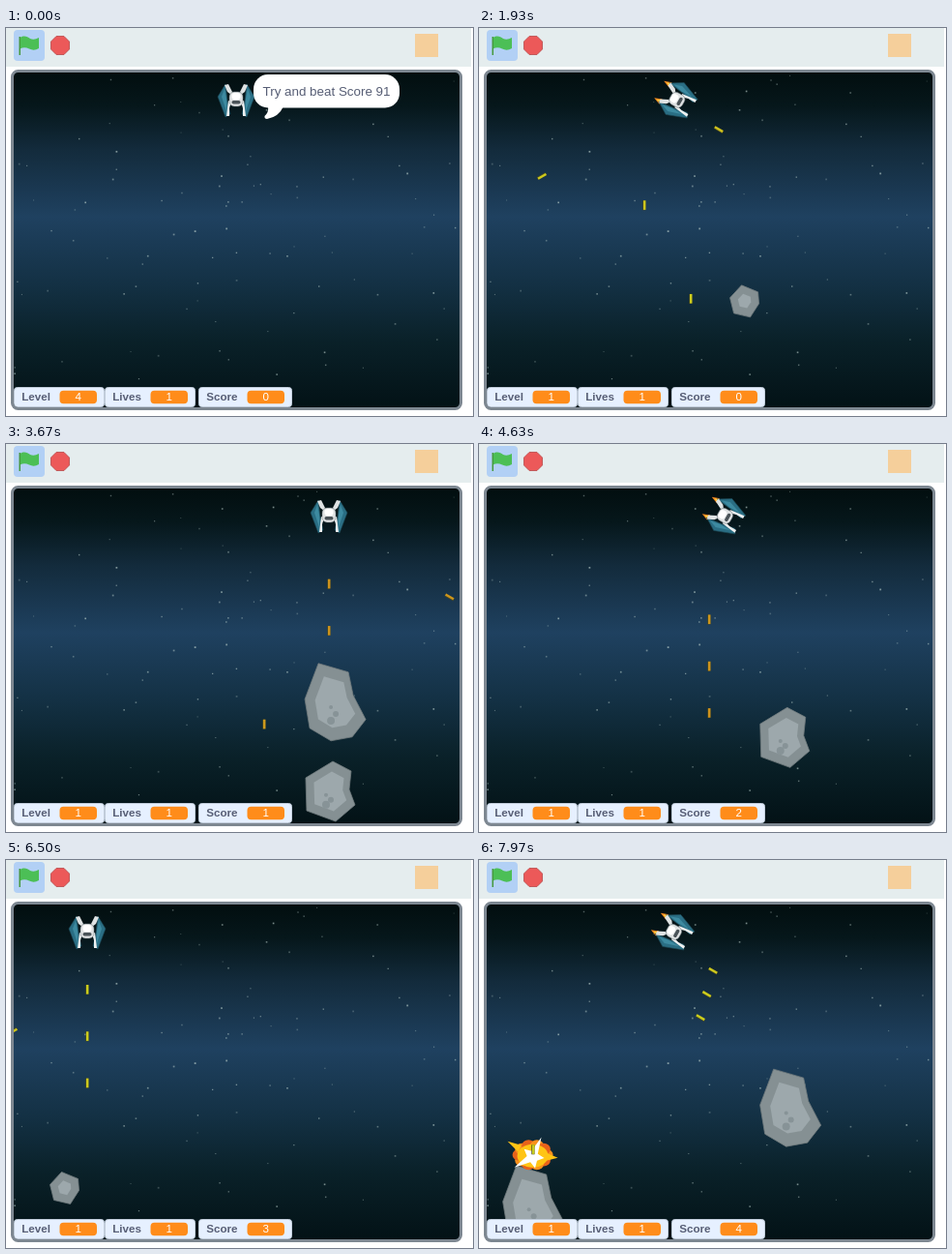
These frames come from a looping animation (483 by 401 pixels, 8000 ms). An HTML page with a canvas:

```html
<!DOCTYPE html>
<html lang="en">
<head>
<meta charset="utf-8">
<title>Asteroid shooter</title>
<style>
html, body { margin: 0; width: 100%; height: 100%; overflow: hidden; background: #fff; }
canvas { display: block; }
</style>
</head>
<body>
<canvas id="stage" width="483" height="401"></canvas>
<script>
const ctx = document.getElementById('stage').getContext('2d');
const LOOP = 8000, INTRO = 600, TAU = Math.PI * 2;
const SPEED = 0.29;                 // ship and bullets, px per ms
const FIRE_GAP = 500 / 3, BULLET_LIFE = 650, MUZZLE = 50;
const SHIP_Y = 75, TILT = Math.PI / 3, LINGER = 100, BLAST = 300;
const FONT = '"Liberation Sans", Arial, sans-serif';

// Moves of the ship: time of departure, x to reach
const moves = [
  [1100, 219], [1500, 171], [1810, 238], [2440, 267], [3105, 334], [3720, 238],
  [4570, 296], [4880, 180], [5800, 84], [6770, 56], [7465, 208]
];

// Bursts of fire: time of the first shot, number of shots
const volleys = [[1230, 5], [2037, 3], [2570, 3], [3103, 4], [4103, 3], [4770, 4], [5470, 8], [6810, 3], [7370, 4]];
const shots = volleys.flatMap(([first, count]) => Array.from({ length: count }, (_, i) => first + i * FIRE_GAP));

const rockKinds = {
  small: { radius: 18, core: .45, edge: [-3,-16, 14,-9, 15,3, 6,17, -11,13, -15,-3] },
  medium: { radius: 31, core: .66, edge: [3,-31, 22,-21, 20,-2, 26,14, 6,31, -24,20, -25,-14] },
  big: { radius: 44, core: .66, edge: [-17,-40, 14,-31, 19,-7, 32,18, 18,36, -4,40, -26,27, -31,-3] }
};

// Position at birth and drift in px per second; hit is when a bullet strikes
const asteroids = [
  { kind: 'small', born: 670, hit: 2860, x: 283, y: 355, vx: -6.7, vy: -58 },
  { kind: 'big', born: 2680, hit: 3720, x: 350, y: 350, vx: -10, vy: -84 },
  { kind: 'medium', born: 3620, hit: 5190, x: 336, y: 362, vx: -20, vy: -58 },
  { kind: 'small', born: 5690, hit: 7530, x: 64, y: 362, vx: -4.3, vy: -29 },
  { kind: 'big', born: 6830, hit: LOOP, x: 326, y: 352, vx: -3.8, vy: -84 },
  { kind: 'big', born: 7650, hit: 7930, x: 55, y: 383, vx: 2, vy: -84 }
];

function seeded(seed) {
  return () => (seed = seed * 16807 % 2147483647) / 2147483647;
}

const random = seeded(91);
const stars = Array.from({ length: 100 }, () => ({
  x: 8 + random() * 460, y: 48 + random() * 318, size: 1 + random() * .8, alpha: .25 + random() * .4
}));

function shipAt(t) {
  let x = 238, dir = 0;
  for (const [depart, goal] of moves) {
    if (t < depart) break;
    const gap = goal - x, run = (t - depart) * SPEED;
    dir = run < Math.abs(gap) ? Math.sign(gap) : 0;
    x = dir ? x + dir * run : goal;
  }
  return { x, angle: -dir * TILT };
}

function bulletAt(t, fired) {
  const { x, angle } = shipAt(fired), reach = MUZZLE + SPEED * (t - fired);
  const edgeX = Math.min(470, Math.max(7, x - Math.sin(angle) * reach));
  return { x: edgeX, y: SHIP_Y + Math.cos(angle) * reach, angle };
}

function rockAt(t, rock) {
  const age = (t - rock.born) / 1000;
  return { x: rock.x + rock.vx * age, y: rock.y + rock.vy * age };
}

function strikes(fired, rock) {
  if (fired > rock.hit || rock.hit - fired > BULLET_LIFE) return false;
  const b = bulletAt(rock.hit, fired), r = rockAt(rock.hit, rock);
  return Math.hypot(b.x - r.x, b.y - r.y) < rockKinds[rock.kind].radius + 5;
}

function paint(fill, stroke, width = 1) {
  ctx.fillStyle = fill;
  ctx.fill();
  if (!stroke) return;
  ctx.strokeStyle = stroke;
  ctx.lineWidth = width;
  ctx.stroke();
}

function poly(points, ...style) {
  ctx.beginPath();
  for (let i = 0; i < points.length; i += 2) ctx.lineTo(points[i], points[i + 1]);
  ctx.closePath();
  paint(...style);
}

function ellipse(x, y, rx, ry, ...style) {
  ctx.beginPath();
  ctx.ellipse(x, y, rx, ry, 0, 0, TAU);
  paint(...style);
}

function box(x, y, w, h, r, ...style) {
  ctx.beginPath();
  ctx.roundRect(x, y, w, h, r);
  paint(...style);
}

function text(str, x, y, font, fill, align = 'left') {
  ctx.font = `${font} ${FONT}`;
  ctx.textAlign = align;
  ctx.fillStyle = fill;
  ctx.fillText(str, x, y);
}

function at({ x, y, angle = 0 }, draw) {
  ctx.save();
  ctx.translate(x, y);
  ctx.rotate(angle);
  draw();
  ctx.restore();
}

function drawToolbar() {
  ctx.fillStyle = '#fff';
  ctx.fillRect(0, 0, 483, 401);
  ctx.fillStyle = '#e5edee';
  ctx.fillRect(0, 0, 481, 40);
  box(8, 2, 32, 32, 4, '#b2d0f5');
  ctx.beginPath();
  ctx.moveTo(14.5, 10);
  ctx.bezierCurveTo(19, 7, 22, 9, 25, 11);
  ctx.quadraticCurveTo(29, 13, 34, 10);
  ctx.lineTo(34, 21);
  ctx.quadraticCurveTo(29, 24, 24, 21.5);
  ctx.quadraticCurveTo(19, 19, 14.5, 21.5);
  paint('#4cbf56');
  ctx.fillStyle = '#45993d';
  ctx.fillRect(13.5, 9, 1.5, 19);
  const octagon = Array.from({ length: 8 }, (_, i) => (i + .5) * TAU / 8);
  poly(octagon.flatMap(a => [56 + 10.3 * Math.cos(a), 18 + 10.3 * Math.sin(a)]), '#ec5959', '#b84848', .8);
  ctx.fillStyle = '#f5cf9b';
  ctx.fillRect(423, 6, 24, 24);
}

function drawSpace() {
  const sky = ctx.createLinearGradient(0, 46, 0, 392);
  const stops = { 0: '#020e0f', .1: '#06171b', .23: '#132b3c', .43: '#1f4160', .64: '#133043', .8: '#0a2129', 1: '#031216' };
  for (const k in stops) sky.addColorStop(k, stops[k]);
  ctx.fillStyle = sky;
  ctx.fillRect(5, 43, 467, 352);
  for (const { x, y, size, alpha } of stars) {
    ctx.fillStyle = `rgb(190 210 205 / ${alpha})`;
    ctx.fillRect(x, y, size, size);
  }
}

function drawRock(t, rock) {
  if (t < rock.born || t >= rock.hit + LINGER) return;
  const { edge, core, radius } = rockKinds[rock.kind];
  at(rockAt(t, rock), () => {
    poly(edge, '#859093', '#717b7e', .8);
    poly(edge.map(v => v * core), '#9da8ac');
    if (radius < 20) return;
    for (let i = 0; i < 3; i++) ellipse(-4 + 5 * (i % 2), radius * (.12 + i * .16), 2 + i, 2 + i, '#879397');
  });
}

function drawBlast(t, rock) {
  const age = t - rock.hit;
  if (age < 0 || age > BLAST) return;
  const { x, y } = rockAt(rock.hit, rock);
  at({ x, y: y - rockKinds[rock.kind].radius * 1.2 }, () => {
    for (let i = 0; i < 10; i++) {
      const a = i * TAU / 10;
      ellipse(14 * Math.cos(a), 10 * Math.sin(a) - 2, 7, 6, i % 2 ? '#e8621a' : '#f8901c');
    }
    ellipse(0, -1, 16, 12, '#ffc414');
    poly([-26,-16, -12,-12, -15,-5], '#ffc414');
    poly([14,-4, 26,1, 14,4], '#ffc414');
    const rays = Array.from({ length: 10 }, (_, i) => [i * TAU / 10 - 1.15, i % 2 ? 6 : 12 + 10 * (i % 3 === 0)]);
    poly(rays.flatMap(([a, r]) => [r * Math.cos(a), r * Math.sin(a)]), '#fff');
  });
}

function drawBullet(t, fired) {
  if (t < fired || t > fired + BULLET_LIFE) return;
  if (asteroids.some(rock => t >= rock.hit + LINGER && strikes(fired, rock))) return;
  const hue = 51 + 12 * Math.cos((fired - 700) / 1000);
  at(bulletAt(t, fired), () => {
    ctx.fillStyle = '#4a4a20';
    ctx.fillRect(-1.7, -5, 3.2, 10);
    ctx.fillStyle = `hsl(${hue} 75% 46%)`;
    ctx.fillRect(-1, -5, 2.4, 9.6);
  });
}

function drawShip(t) {
  const { x, angle } = shipAt(t);
  at({ x, y: SHIP_Y, angle }, () => {
    for (const side of [-1, 1]) {
      ctx.save();
      ctx.scale(side, 1);
      if (angle) {
        poly([7,-15, 10,-23, 13,-15], '#f58a1f');
        poly([8.5,-15, 10,-20, 11.5,-15], '#ffe04a');
      }
      poly([11,-17, 19,-4, 11,17, 6,14, 9,0], '#2a6e84', '#1b4552', .6);
      poly([12,-12, 15,-4, 10,11, 10,-2], '#3d8aa0');
      poly([8,-17, 12,-16, 9,-9, 5,-6, 4,-9], '#dfe3e4');
      poly([5,1, 8,0, 10,16, 7,16, 7,8], '#eef0f0');
      ctx.restore();
    }
    box(-7, -9, 14, 15, 5, '#dfe2e3', '#6b767b', .5);
    box(-4.5, -8, 9, 7, 3, '#fff');
    box(-4.5, 0, 9, 3.5, 1.7, '#4a5358');
  });
}

function drawMonitor(x, w, label, value) {
  box(x + .5, 371.5, w - 1, 20, 3, '#e6f0ff', '#c1ccda');
  text(label, x + 8.2, 385, 'bold 11.6px', '#575e75');
  box(x + w - 46.5, 374.7, 38.5, 13.5, 4, '#ff8c1a');
  text(value, x + w - 27.3, 385.3, '11.6px', '#fff', 'center');
}

function drawBubble() {
  box(256, 48, 151, 34.5, 15, '#fff');
  ctx.beginPath();
  ctx.moveTo(271, 81);
  ctx.quadraticCurveTo(272, 87, 267.5, 91);
  ctx.quadraticCurveTo(267, 94, 270, 94);
  ctx.quadraticCurveTo(282, 92, 287, 81);
  paint('#fff');
  text('Try and beat Score 91', 265.5, 70, '13.4px', '#575e75');
}

function draw(t) {
  drawToolbar();
  ctx.save();
  ctx.beginPath();
  ctx.roundRect(6, 44, 465, 350, 6);
  ctx.clip();
  drawSpace();
  asteroids.forEach(rock => drawRock(t, rock));
  asteroids.forEach(rock => drawBlast(t, rock));
  shots.forEach(fired => drawBullet(t, fired));
  drawShip(t);
  drawMonitor(8, 94, 'Level', t < INTRO ? 4 : 1);
  drawMonitor(102, 94, 'Lives', 1);
  drawMonitor(199, 97, 'Score', asteroids.filter(rock => t >= rock.hit + LINGER).length);
  if (t < INTRO) drawBubble();
  ctx.restore();
  ctx.beginPath();
  ctx.roundRect(6.5, 44.5, 464, 349, 6);
  ctx.strokeStyle = '#7d8791';
  ctx.lineWidth = 3;
  ctx.stroke();
}

const start = performance.now();
function tick() {
  draw((performance.now() - start) % LOOP);
  requestAnimationFrame(tick);
}
tick();
</script>
</body>
</html>
```
